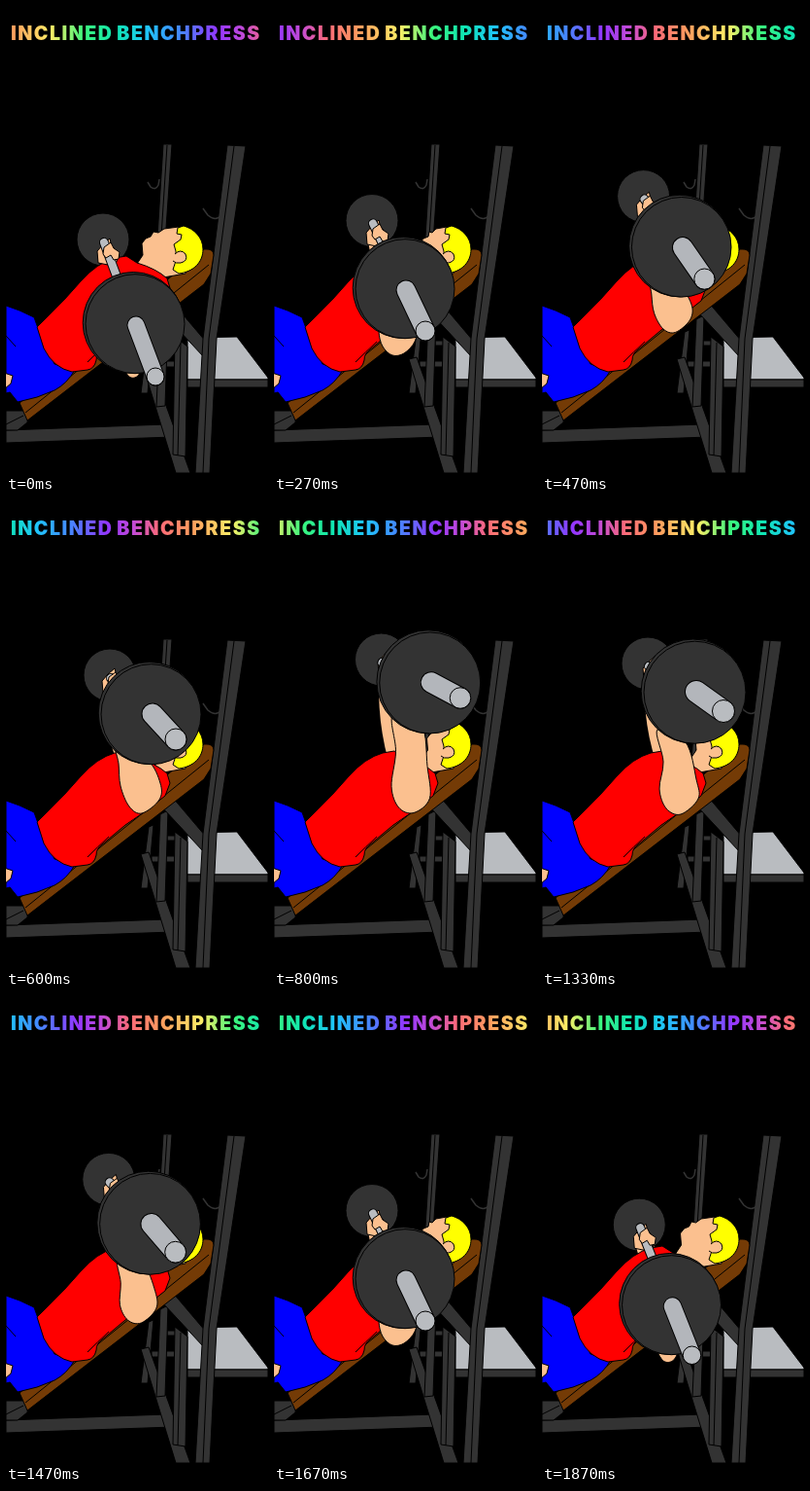
Write an HTML page that moves like this. It is 270 px wide and 480 px high and loops after 1.94 s.

```html
<!DOCTYPE html>
<html lang="en">
<head>
<meta charset="utf-8">
<title>Inclined benchpress</title>
<style>
html, body { margin: 0; width: 100%; height: 100%; overflow: hidden; background: #000; }
svg { display: block; width: 100vw; height: 100vh; }
svg * { stroke-linejoin: round; }
text { font: 900 19.5px Inter, "Open Sans", sans-serif; letter-spacing: 1.55px; word-spacing: -1.5px; }
.steel { fill: #333; stroke: #000; }
.metal { fill: #b9bcc0; stroke: #000; }
.skin { fill: #fbc08f; stroke: #000; }
.pad { fill: #743b06; stroke: #000; }
.hair { fill: #ff0; stroke: #000; }
.shirt { fill: #f00; stroke: #000; }
.pants { fill: #00f; stroke: #000; }
.line { fill: none; stroke: #000; }
.hook { fill: none; stroke: #333; stroke-width: 1.5; }
.tube { fill: none; stroke-linecap: round; }
</style>
</head>
<body>
<svg viewBox="0 0 270 480">
  <defs>
    <linearGradient id="rainbow" gradientUnits="userSpaceOnUse" x1="5" x2="305" y1="0" y2="0" spreadMethod="repeat">
      <stop offset="0" stop-color="#ff9c5e"/>
      <stop offset=".14" stop-color="#fbee66"/>
      <stop offset=".25" stop-color="#3cf57c"/>
      <stop offset=".36" stop-color="#0fe6b2"/>
      <stop offset=".47" stop-color="#1fc4fa"/>
      <stop offset=".58" stop-color="#4488ff"/>
      <stop offset=".71" stop-color="#9236ff"/>
      <stop offset=".8" stop-color="#c24ad6"/>
      <stop offset=".89" stop-color="#fb6a78"/>
      <stop offset="1" stop-color="#ff9c5e"/>
    </linearGradient>
  </defs>

  <text x="5" y="35" fill="url(#rainbow)">INCLINED BENCHPRESS</text>

  <!-- rack and bench -->
  <path class="steel" d="M162 142H171L160 300H152Z"/>
  <path class="line" d="M166 143L156 300"/>
  <path class="hook" d="M146 181L149 186Q154 190 157 184L158 178"/>
  <path class="metal" d="M187 341L238 340L270 382V384H187Z"/>
  <path class="steel" d="M187 384H270V392H187Z"/>
  <path class="steel" d="M150 365H178V371H150ZM166 344H178V349H166Z"/>
  <path class="steel" d="M0 436L165 430L172 443L0 449Z"/>
  <path class="steel" d="M147 335L152 333L146 398H139Z"/>
  <path class="steel" d="M139 363L147 361L190 480H175Z"/>
  <path class="steel" d="M159 322L167 318L164 411L155 412Z"/>
  <path class="steel" d="M162 316L172 305L206 345L204 361Z"/>
  <path class="steel" d="M174 340L187 350L185 463L172 461Z"/>
  <path class="line" d="M180 346L177 462"/>
  <path class="steel" d="M0 416H23L22 428L12 436H0Z"/>
  <path class="line" d="M0 430L18 421"/>
  <path class="steel" d="M228 143L247 144L217 342L210 480H195L203 342Z"/>
  <path class="line" d="M235 144L209 342L203 480"/>
  <path class="hook" d="M203 208L208 215Q216 222 222 215L224 208"/>
  <path class="pad" d="M14 408L204 250Q214 249 214 256L211 275L204 286L22 426Z"/>
  <path class="line" d="M20 418L209 266"/>

  <!-- lifter and far end of the bar -->
  <circle id="farPlate" class="steel" r="27"/>
  <path id="farArmEdge" class="tube" stroke="#000" stroke-width="20"/>
  <path id="farArm" class="tube" stroke="#fbc08f" stroke-width="18"/>
  <path id="face" class="skin"/>
  <path class="hair" d="M183 226C194 229 203 238 203 250C203 263 194 273 178 275L172 271L175 262L175 252L173 245L180 240L181 235L176 234L177 228Z"/>
  <path class="skin" d="M174 255Q180 249 185 255Q188 262 180 264Q175 265 172 262"/>
  <path class="pants" d="M0 308L14 313L29 320L34 334L40 350L50 368L71 374Q63 388 50 395L32 402L12 407L4 397L0 398Z"/>
  <path class="line" d="M0 339L10 350"/>
  <path class="skin" d="M-2 377L7 380L5 388L-2 394Z"/>
  <path class="shirt" d="M32 330L46 316L60 302L77 283Q94 264 112 259L124 257L135 264Q155 270 166 280L169 290L164 303L145 318L123 333L99 353Q93 357 93 364Q91 373 84 374L68 376Q49 372 39 352Z"/>
  <path class="line" d="M84 366Q94 356 106 345"/>
  <path id="palm" class="skin" d="M-10 8L-11 -4L-5 -11L2 -17L4 -8L11 -2L9 7L0 10Z"/>
  <path id="barEdge" class="tube" stroke="#000" stroke-width="10"/>
  <path id="bar" class="tube" stroke="#b9bcc0" stroke-width="8"/>
  <path id="fingers" class="skin" d="M-4 -8L3 -13L6 -7L12 -3L11 4L6 5L3 0L-2 3L-5 -1Z"/>

  <!-- near arm and near end of the bar -->
  <path id="arm" class="skin"/>
  <circle id="plateBack" class="steel"/>
  <circle id="plate" class="steel"/>
  <path id="sleeveEdge" class="tube" stroke="#000"/>
  <path id="sleeve" class="tube" stroke="#b3b6bb"/>
  <circle id="cap" class="metal"/>
</svg>
<script>
const LOOP = 1940, STEPS = 29, HUE_WIDTH = 300;
const $ = id => document.getElementById(id);
const set = (id, attrs) => {
  for (const key in attrs) $(id).setAttribute(key, attrs[key]);
};

const low = {
  plate: [132, 326, 52], far: [100, 240], hub: [134, 328], cap: [154, 381, 9.5],
  hand: [105, 256], elbow: [108, 282], face: [0],
  arm: [118, 340, 117, 355, 120, 368, 127, 381, 136, 380, 141, 366, 142, 350, 130, 335]
};
const lower = {
  plate: [134, 290, 52], far: [101, 220.5], hub: [136, 292], cap: [156, 334, 10.5],
  hand: [106, 237], elbow: [107, 268], face: [10],
  arm: [110, 320, 108, 335, 112, 350, 122, 359, 134, 357, 145, 345, 146, 330, 130, 315]
};
const rising = {
  plate: [148.5, 218.5, 52.5], far: [107, 179], hub: [151, 219], cap: [175, 245, 11.5],
  hand: [110, 189], elbow: [110, 248], face: [17],
  arm: [113, 245, 116, 270, 118, 293, 127, 314, 140, 321, 158, 307, 159, 290, 146, 266]
};
const extended = {
  plate: [171, 154, 53.5], far: [114, 147], hub: [173, 154], cap: [209, 160, 11],
  hand: [126, 150], elbow: [117, 205], face: [18],
  arm: [132, 195, 135, 245, 124, 294, 130, 316, 148, 320, 163, 304, 157, 255, 158, 195]
};
const falling = {
  plate: [156.5, 196, 53.5], far: [109, 167], hub: [159, 196], cap: [187, 216, 12],
  hand: [115, 176], elbow: [112, 232], face: [18],
  arm: [119, 235, 125, 268, 121, 296, 128, 316, 143, 322, 161, 306, 159, 286, 148, 248]
};
const keys = [[0, low], [4, lower], [9, rising], [15, extended], [20, falling], [25, lower], [29, low]];

function poseAt(step) {
  const i = keys.findIndex(([at]) => at > step);
  const [from, a] = keys[i - 1], [to, b] = keys[i];
  const u = (step - from) / (to - from);
  const pose = {};
  for (const part in a) pose[part] = a[part].map((v, j) => v + (b[part][j] - v) * u);
  return pose;
}

// Closed curve through a flat list of points
function smooth(flat) {
  const n = flat.length / 2;
  const pt = i => [flat[(i + n) % n * 2], flat[(i + n) % n * 2 + 1]];
  let d = "M" + pt(0);
  for (let i = 0; i < n; i++) {
    const [p, q, r, s] = [-1, 0, 1, 2].map(o => pt(i + o));
    const c1 = q.map((v, j) => v + (r[j] - p[j]) / 6);
    const c2 = r.map((v, j) => v - (s[j] - q[j]) / 6);
    d += `C${c1} ${c2} ${r}`;
  }
  return d + "Z";
}

const facePath = x =>
  `M${133 + x} 268L${141 + x} 256L${140 + x} 244L${144 + x} 239L${149 + x} 237` +
  `L${152 + x * .8} 232L${157 + x * .6} 233L${163 + x * .4} 229L178 227L190 250L185 275L162 279Z`;

function render(step) {
  const { plate, far, hub, cap, hand, elbow, face, arm } = poseAt(step);
  const [x, y, r] = plate;
  set("rainbow", { gradientTransform: `translate(${step * 2 * HUE_WIDTH / STEPS})` });
  set("farPlate", { cx: far[0], cy: far[1] });

  const farArm = `M${hand}Q${elbow} 130 276`;
  set("farArmEdge", { d: farArm });
  set("farArm", { d: farArm });
  set("face", { d: facePath(face[0]) });

  const grip = `translate(${hand})`;
  const bar = `M${far[0] + 1} ${far[1] + 3}L${x} ${y}`;
  set("palm", { transform: grip });
  set("fingers", { transform: grip });
  set("barEdge", { d: bar });
  set("bar", { d: bar });

  set("arm", { d: smooth(arm) });
  set("plateBack", { cx: x - .8, cy: y - .5, r });
  set("plate", { cx: x + 1, cy: y + .7, r: r - 1 });
  const sleeve = `M${hub}L${cap[0]} ${cap[1]}`;
  set("sleeveEdge", { d: sleeve, "stroke-width": cap[2] * 2 });
  set("sleeve", { d: sleeve, "stroke-width": cap[2] * 2 - 2 });
  set("cap", { cx: cap[0], cy: cap[1], r: cap[2] - .5 });
}

function tick() {
  const t = performance.now() % LOOP;
  render(Math.min(STEPS - 1, Math.floor((t + 3.4) / (200 / 3))));
  requestAnimationFrame(tick);
}
tick();
</script>
</body>
</html>
```
